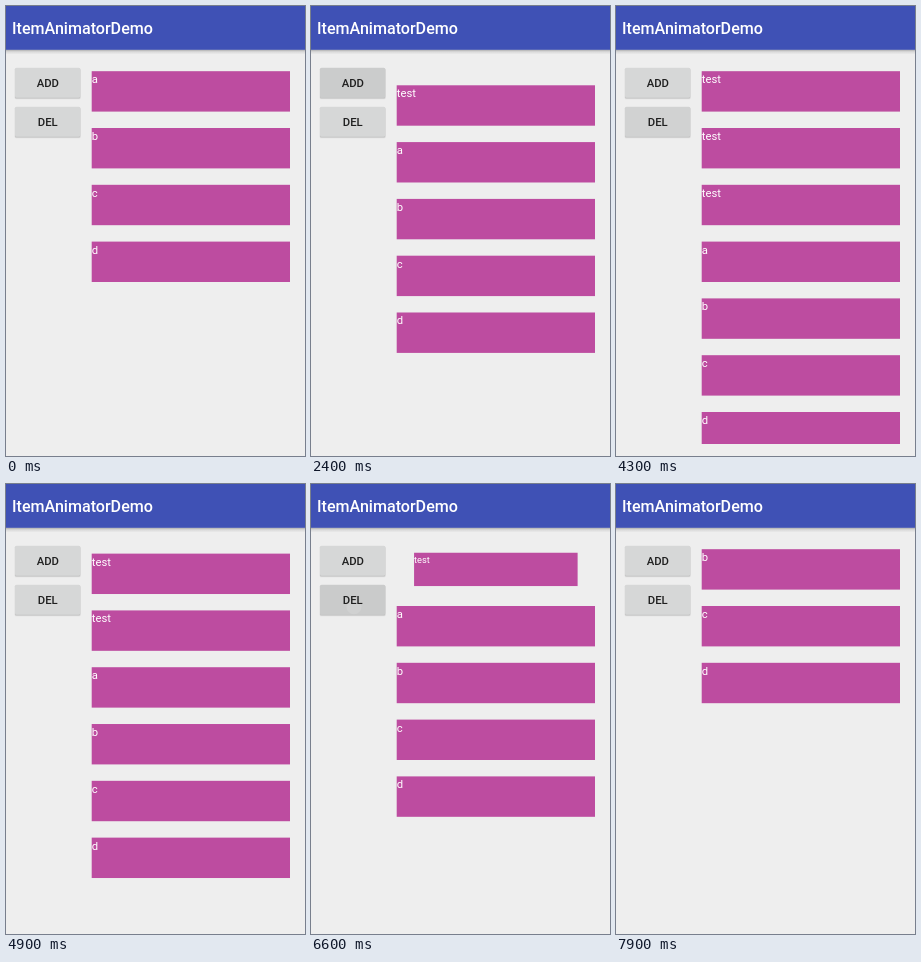
Animation, 299 px wide and 450 px high, one loop 8700 ms. Source, as an HTML page:

```html
<!DOCTYPE html>
<html lang="en">
<head>
<meta charset="utf-8">
<title>List animation</title>
<style>
html, body { margin: 0; width: 100%; height: 100%; overflow: hidden; background: #eee; }
svg { display: block; width: 299px; height: 450px; font-family: Roboto, sans-serif; }
.title { font-size: 16.1px; font-weight: 500; fill: #fff; }
.label { font-size: 11.3px; font-weight: 500; fill: #1f1f1f; text-anchor: middle; }
.row text { font-size: 11.3px; fill: #fff; }
.row rect { fill: #bd4ca0; }
</style>
</head>
<body>
<svg id="stage" viewBox="0 0 299 450">
  <defs>
    <linearGradient id="shade" x1="0" y1="0" x2="0" y2="1">
      <stop offset="0" stop-color="#000" stop-opacity=".3"/>
      <stop offset=".45" stop-color="#000" stop-opacity=".09"/>
      <stop offset="1" stop-color="#000" stop-opacity="0"/>
    </linearGradient>
    <clipPath id="listClip"><rect x="84" y="57" width="200" height="381"/></clipPath>
  </defs>
  <rect width="299" height="450" fill="#eee"/>
  <rect y="43.5" width="299" height="5" fill="url(#shade)"/>
  <rect width="299" height="43.8" fill="#3f51b5"/>
  <text class="title" x="6" y="27.7">ItemAnimatorDemo</text>
  <g id="buttons"></g>
  <g id="list" clip-path="url(#listClip)"></g>
</svg>
<script>
const LOOP = 8700, STEP = 100;
const MOVE = 250, SCALE = 120;
const LEFT = 85.7, TOP = 65.2, WIDTH = 198.3, HEIGHT = 40.4, PITCH = 56.8;
const labels = ["test", "test", "test", "a", "b", "c", "d"];

// at: press time, lead: delay until the list reacts
const taps = [
  { at: 1000, add: true, lead: 245 },
  { at: 2100, add: true, lead: 217 },
  { at: 3200, add: true, lead: 225 },
  { at: 4300, add: false, lead: 275 },
  { at: 5300, add: false, lead: 270 },
  { at: 6300, add: false, lead: 267 },
  { at: 7300, add: false, lead: 220 }
];

const clamp = v => Math.min(1, Math.max(0, v));
const ease = v => (1 - Math.cos(Math.PI * clamp(v))) / 2;

function make(parent, tag, attrs, text) {
  const el = document.createElementNS("http://www.w3.org/2000/svg", tag);
  for (const key in attrs) el.setAttribute(key, attrs[key]);
  if (text) el.textContent = text;
  return parent.appendChild(el);
}

function makeButton(text, y) {
  const g = make(document.getElementById("buttons"), "g", { transform: `translate(9 ${y})` });
  const box = { width: 65.3, height: 30, rx: 1.6 };
  make(g, "rect", { ...box, x: -0.4, width: 66.1, y: 0.4, height: 31.2, fill: "#000", opacity: 0.07 });
  make(g, "rect", { ...box, y: 0.8, fill: "#000", opacity: 0.13 });
  make(g, "rect", { ...box, fill: "#d6d7d7" });
  const press = make(g, "rect", { ...box, fill: "#000", opacity: 0 });
  const dot = make(g, "circle", { cx: 34, cy: 22, r: 7.5, fill: "#fff", opacity: 0 });
  make(g, "text", { class: "label", x: 32.8, y: 19.4 }, text);
  return { press, dot };
}

const addButton = makeButton("ADD", 61.7);
const delButton = makeButton("DEL", 100.7);

const rows = labels.map(text => {
  const g = make(document.getElementById("list"), "g", { class: "row" });
  make(g, "rect", { width: WIDTH, height: HEIGHT });
  make(g, "text", { x: 0, y: 12 }, text);
  return g;
});

// Position of the list head and the scale of each row
function listState(t) {
  let head = 3;
  const scales = labels.map((_, i) => i < head ? 0 : 1);
  for (const { at, add, lead } of taps) {
    const start = at + lead;
    if (t < start) break;
    if (add) {
      scales[head - 1] = ease((t - start - MOVE) / SCALE);
      head -= ease((t - start) / MOVE);
    } else {
      scales[head] = 1 - ease((t - start) / SCALE);
      head += ease((t - start - SCALE) / MOVE);
    }
  }
  return { head, scales };
}

function pressLevel(t, add) {
  const tap = taps.find(p => p.add === add && t >= p.at && t < p.at + 700);
  if (!tap) return 0;
  const d = t - tap.at;
  return Math.min(clamp(0.4 + d / 150), clamp((600 - d) / 300));
}

function draw(t) {
  const { head, scales } = listState(t);
  rows.forEach((row, i) => {
    const s = scales[i];
    const x = LEFT + WIDTH * (1 - s) / 2;
    const slot = s < 1 ? 0 : i - head;
    const y = TOP + slot * PITCH + HEIGHT * (1 - s) / 2;
    row.setAttribute("transform", `translate(${x} ${y}) scale(${s})`);
    row.setAttribute("display", s > 0.001 ? "inline" : "none");
  });
  const del = pressLevel(t, false);
  addButton.press.setAttribute("opacity", 0.05 * pressLevel(t, true));
  delButton.press.setAttribute("opacity", 0.055 * del);
  delButton.dot.setAttribute("opacity", del > 0.9 ? 0.13 : 0);
}

const begin = performance.now();
function tick() {
  const t = (performance.now() - begin) % LOOP;
  draw(Math.floor(t / STEP) * STEP);
  requestAnimationFrame(tick);
}
draw(0);
requestAnimationFrame(tick);
</script>
</body>
</html>
```
